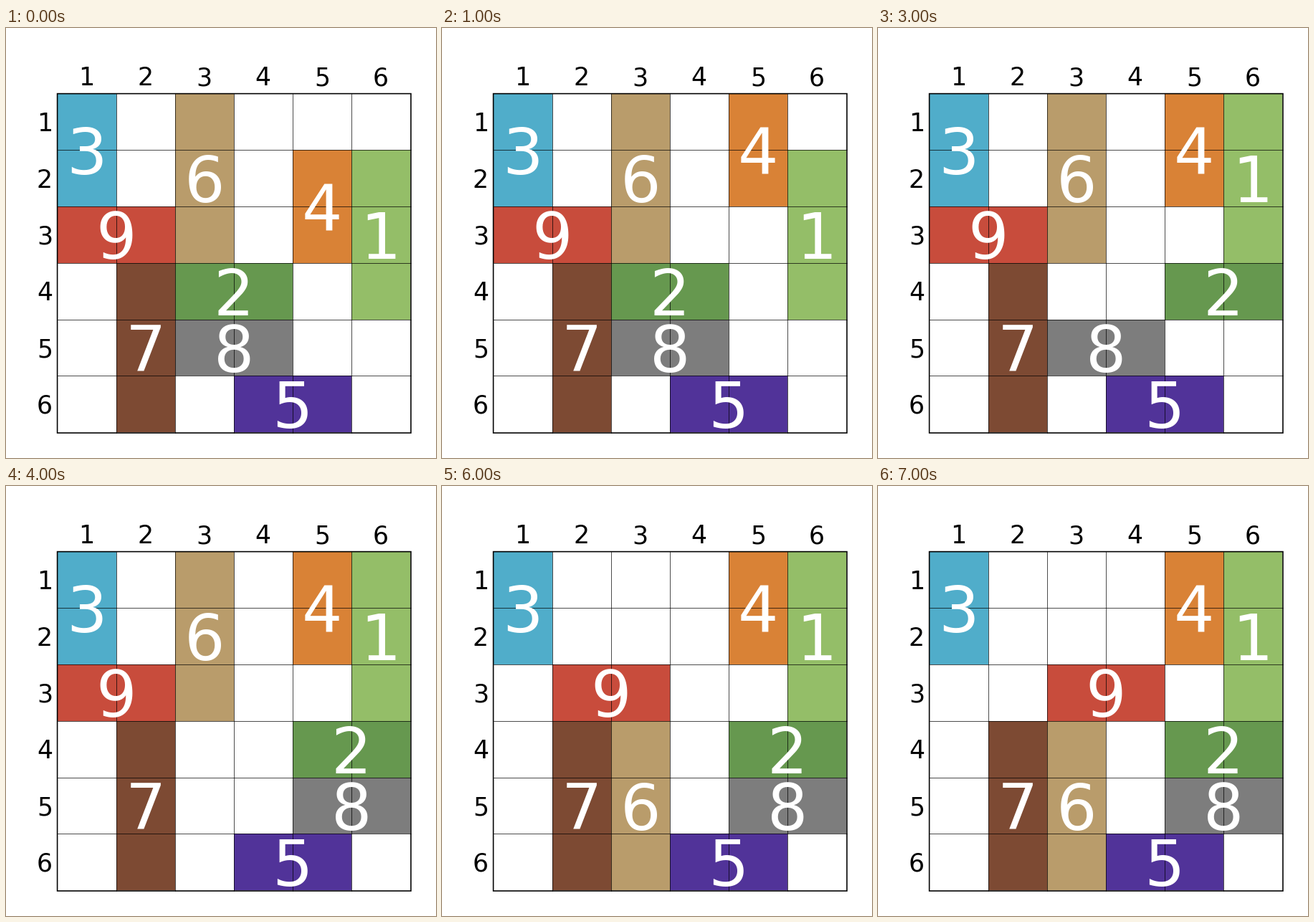
A matplotlib script for the animation above (8000 ms loop, 600x600 px).

```python
import matplotlib.pyplot as plt
from matplotlib.animation import FuncAnimation
from matplotlib.patches import Rectangle

DPI = 100
SIZE = 600
PX = 72 / DPI                      # points per pixel
LEFT, TOP = 71.6, 91.12
CELL_W, CELL_H = 82.05, 78.85
TEXT_LIFT = 0.3
N = 6

# label: (column, row, columns wide, rows high, colour)
BLOCKS = {
    1: (5, 1, 1, 3, "#94be68"),
    2: (2, 3, 2, 1, "#66984f"),
    3: (0, 0, 1, 2, "#50adca"),
    4: (4, 1, 1, 2, "#d98236"),
    5: (3, 5, 2, 1, "#513399"),
    6: (2, 0, 1, 3, "#b99c6b"),
    7: (1, 3, 1, 3, "#7d4a33"),
    8: (2, 4, 2, 1, "#7d7d7d"),
    9: (0, 2, 2, 1, "#c84c3c"),
}

# One move per step: label, column shift, row shift
MOVES = [(4, 0, -1), (1, 0, -1), (2, 2, 0), (8, 2, 0),
         (6, 0, 3), (9, 1, 0), (9, 1, 0)]


def grid_x(col):
    return LEFT + col * CELL_W


def grid_y(row):
    return TOP + row * CELL_H


def snap(v):
    return int(v + 0.5)


plt.rcParams["font.family"] = "DejaVu Sans"
fig = plt.figure(figsize=(SIZE / DPI, SIZE / DPI), dpi=DPI, facecolor="white")
ax = fig.add_axes([0, 0, 1, 1])
ax.set_xlim(0, SIZE)
ax.set_ylim(SIZE, 0)
ax.axis("off")

# Whole-pixel coordinates: the renderer moves thin lines to pixel centres
for i in range(1, N):
    x, y = snap(grid_x(i)), snap(grid_y(i))
    style = dict(color="black", lw=0.5, zorder=2)
    ax.plot([x, x], [92, 565], **style)
    ax.plot([72, 565], [y, y], **style)

ax.add_patch(Rectangle((71.6, 91.6), 493.4, 473.4, fill=False, ec="black",
                       lw=1.6 * PX, snap=False, zorder=4))

for i in range(N):
    ax.text(grid_x(i + 0.5), 80.5, str(i + 1), fontsize=25,
            ha="center", va="baseline")
    ax.text(54, grid_y(i + 0.5) - TEXT_LIFT, str(i + 1), fontsize=25,
            ha="center", va="center_baseline")

rects, digits = {}, {}
for label, (_, _, _, _, colour) in BLOCKS.items():
    rects[label] = ax.add_patch(Rectangle((0, 0), 1, 1, fc=colour, lw=0,
                                          antialiased=False, zorder=1))
    digits[label] = ax.text(0, 0, str(label), fontsize=64, color="white",
                            ha="center", va="center_baseline", zorder=3)


def place(label, col, row, wide, high):
    x0, x1 = snap(grid_x(col)), snap(grid_x(col + wide))
    y0, y1 = snap(grid_y(row)), snap(grid_y(row + high))
    rects[label].set_bounds(x0, y0, x1 - x0, y1 - y0)
    digits[label].set_position((grid_x(col + wide / 2),
                                grid_y(row + high / 2) - TEXT_LIFT))


def update(step):
    done = MOVES[:step]
    for label, (col, row, wide, high, _) in BLOCKS.items():
        dx = sum(m[1] for m in done if m[0] == label)
        dy = sum(m[2] for m in done if m[0] == label)
        place(label, col + dx, row + dy, wide, high)
    return [*rects.values(), *digits.values()]


anim = FuncAnimation(fig, update, frames=len(MOVES) + 1, interval=1000,
                     repeat=True, repeat_delay=0, blit=False)
plt.show()
```
